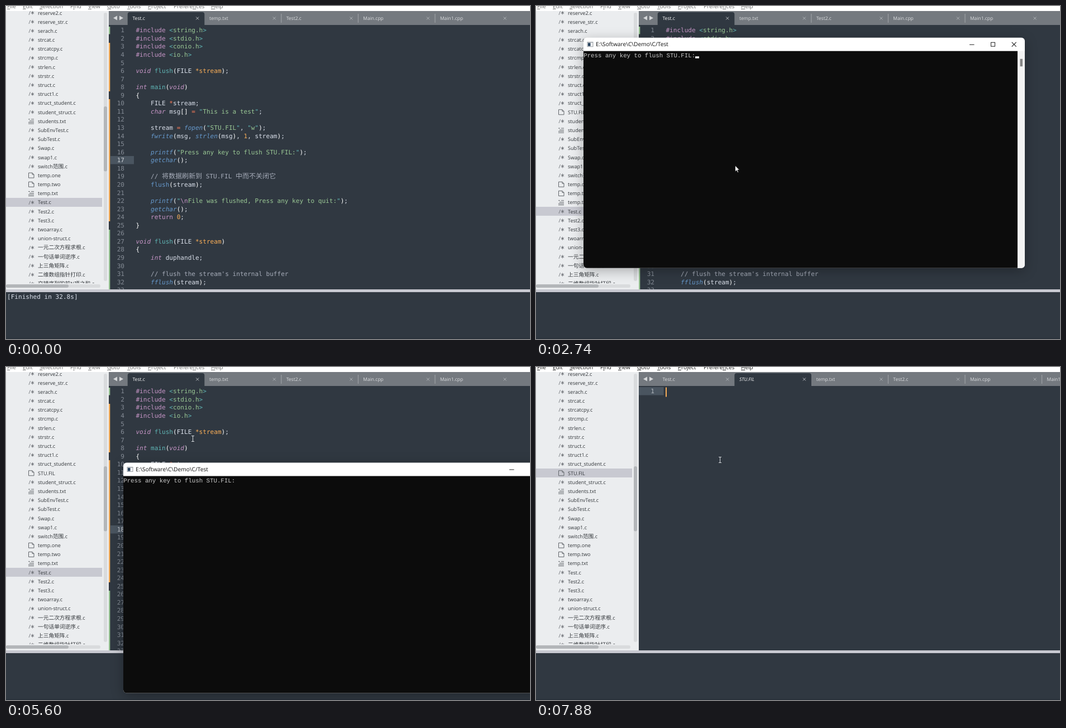
An HTML page with a canvas that plays this animation: 938 px wide and 597 px high, repeating every 8000 ms.

```html
<!DOCTYPE html>
<html lang="en">
<head>
<meta charset="utf-8">
<title>Flush demo</title>
<style>
html, body { margin: 0; width: 100%; height: 100%; overflow: hidden; background: #303841; }
canvas { display: block; width: 938px; height: 597px; }
</style>
</head>
<body>
<canvas id="stage" width="938" height="597"></canvas>
<script>
const W = 938, H = 597, LOOP = 8000;
const MONO = '"DejaVu Sans Mono", monospace';
const SANS = '"Open Sans", "Noto Sans", sans-serif';
const CJK = '"Noto Sans CJK SC", "Noto Sans CJK", sans-serif';
const C = {
  bg: '#303841', bar: '#74797f', line: '#4a5560', side: '#ebedef', pick: '#c8c9d1', hover: '#dfe1e4',
  text: '#d8dee9', purple: '#c695c6', blue: '#6699cc', teal: '#5fb4b4', green: '#99c794',
  orange: '#f9ae58', red: '#f97b58', note: '#a6acb9', num: '#848b95'
};
const T = { click: 1180, clear: 1990, open: 2320, ready: 2440, run: 2600, drag: 4860, drop: 5200, back: 5870, view: 7340 };

const CODE = `#include <string.h>
#include <stdio.h>
#include <conio.h>
#include <io.h>

void flush(FILE *stream);

int main(void)
{
    FILE *stream;
    char msg[] = "This is a test";

    stream = fopen("STU.FIL", "w");
    fwrite(msg, strlen(msg), 1, stream);

    printf("Press any key to flush STU.FIL:");
    getchar();

    // 将数据刷新到 STU.FIL 中而不关闭它
    flush(stream);

    printf("\\nFile was flushed, Press any key to quit:");
    getchar();
    return 0;
}

void flush(FILE *stream)
{
    int duphandle;

    // flush the stream's internal buffer
    fflush(stream);
`.split('\n');

// Later rules override earlier ones: pattern, colour, italic
const RULES = [
  [/[()[\]{}]/g, '#ffffff'],
  [/\b(void|int|char)\b/g, C.purple, true],
  [/#include|\breturn\b/g, C.purple],
  [/\b(fopen|fwrite|strlen|printf|getchar|fflush)\b/g, C.blue, true],
  [/\bflush(?=\(stream)/g, C.blue],
  [/(?<=void )flush|\bmain\b/g, C.teal],
  [/\b\d+\b/g, C.orange],
  [/[=*]/g, C.red],
  [/\*stream(?=\))/g, C.orange],
  [/"[^"]*"|<.*>/g, C.green],
  [/["<>]/g, C.teal],
  [/\\n/g, C.purple],
  [/\/\/.*/g, C.note]
];

const FILES = ('reserve2.c reserve_str.c serach.c strcat.c strcatcpy.c strcmp.c strlen.c strstr.c struct.c struct1.c ' +
  'struct_student.c student_struct.c students.txt SubEnvTest.c SubTest.c Swap.c swap1.c switch范围.c temp.one temp.two ' +
  'temp.txt Test.c Test2.c Test3.c twoarray.c union-struct.c 一元二次方程求根.c 一句话单词逆序.c 上三角矩阵.c ' +
  '二维数组指针打印.c 交错序列的前N项之和.c').split(' ');
const FILES2 = [...FILES.slice(0, 11), 'STU.FIL', ...FILES.slice(11)];

// label, x, index of the underlined letter
const MENU = [['File', 2, 0], ['Edit', 30, 0], ['Selection', 60, 0], ['Find', 115, 1], ['View', 147, 0], ['Goto', 181, 0],
  ['Tools', 217, 0], ['Project', 254, 0], ['Preferences', 300, 7], ['Help', 367, 0]];

// Pointer path: time, x, y
const PATH = [
  [260, 736, 523], [460, 459.5, 384.5], [660, 459, 383.5], [920, 357.5, 286.5], [2319, 357.5, 286.5],
  [2320, 356.5, 286], [2760, 356.5, 286], [3000, 329, 33], [3600, 329, 33], [4460, 309.5, 65.5], [4800, 309.5, 66],
  [5200, 434.5, 181], [5340, 434.5, 181], [5600, 334.5, 128.5], [5950, 334.5, 128.5], [6060, 339, 124],
  [6500, 41, 197], [6740, 62, 195.5], [6880, 62, 195], [7080, 67, 188.5], [7400, 67, 188.5], [7880, 329.5, 166.5]
];

const stage = document.getElementById('stage');
let g = stage.getContext('2d');
g.textRendering = 'geometricPrecision';

const isCjk = ch => /[\u3400-\u9fff]/.test(ch);
const lineY = n => 43.5 + 14.56 * (n - 1);
const rowY = i => 12.2 + 16.19 * i;
const mix = (a, b, p) => a + (b - a) * p;

function rect(x, y, w, h, color) {
  g.fillStyle = color;
  g.fillRect(x, y, w, h);
}

function round(x, y, w, h, r, color) {
  g.fillStyle = color;
  g.beginPath();
  g.roundRect(x, y, w, h, r);
  g.fill();
}

function lines(color, width, ...paths) {
  g.strokeStyle = color;
  g.lineWidth = width;
  g.beginPath();
  for (const p of paths) p.forEach(([x, y], i) => i ? g.lineTo(x, y) : g.moveTo(x, y));
  g.stroke();
}

function poly(points, color) {
  g.fillStyle = color;
  g.beginPath();
  points.forEach(([x, y]) => g.lineTo(x, y));
  g.closePath();
  g.fill();
}

function clip(x, y, w, h, draw) {
  g.save();
  g.beginPath();
  g.rect(x, y, w, h);
  g.clip();
  draw();
  g.restore();
}

function label(s, x, y, size, color, style = '') {
  g.fillStyle = color;
  for (const part of s.match(/[\u3400-\u9fff]+|[^\u3400-\u9fff]+/g)) {
    g.font = isCjk(part) ? `${size * 1.07}px ${CJK}` : `${style} ${size}px ${SANS}`;
    g.fillText(part, x, y);
    x += g.measureText(part).width;
  }
}

function mono(s, x, y, size, step, paint) {
  [...s].forEach((ch, i) => {
    const [color, italic] = paint(i);
    const wide = isCjk(ch);
    if (ch !== ' ') {
      g.fillStyle = color;
      g.font = wide ? `12px ${CJK}` : `${italic ? 'italic ' : ''}${size}px ${MONO}`;
      g.fillText(ch, x, y);
    }
    x += wide ? 12 : step;
  });
}

function codeLine(s, n) {
  const look = Array.from(s, () => [C.text, false]);
  for (const [re, color, italic] of RULES)
    for (const m of s.matchAll(re)) look.fill([color, italic], m.index, m.index + m[0].length);
  mono(s, 232.4, lineY(n) + 3.8, 11.06, 6.66, i => look[i]);
}

function lineNumber(n, color = C.num) {
  const s = String(n);
  mono(s, 212 - 6.66 * s.length, lineY(n) + 3.8, 11.06, 6.66, () => [color]);
}

// Code and line numbers never change, so they are drawn once
function makeLayer() {
  const layer = document.createElement('canvas');
  layer.width = W;
  layer.height = H;
  const main = g;
  g = layer.getContext('2d');
  g.textRendering = 'geometricPrecision';
  CODE.forEach((s, i) => {
    lineNumber(i + 1);
    codeLine(s, i + 1);
  });
  g = main;
  return layer;
}

function drawMenu(active) {
  rect(0, 0, W, 9, '#ffffff');
  const color = active ? '#1a1a1a' : '#6d6d6d';
  for (const [s, x, k] of MENU) {
    label(s, x, 4, 10, color);
    const a = x + g.measureText(s.slice(0, k)).width;
    rect(a, 5, g.measureText(s[k]).width, 0.9, color);
  }
}

function cross(x, y, r, color, width = 1) {
  lines(color, width, [[x - r, y - r], [x + r, y + r]], [[x + r, y - r], [x - r, y + r]]);
}

function drawTabs(view) {
  rect(184, 9, W - 184, 25, C.bar);
  poly([[192, 21.5], [199, 17.5], [199, 25.5]], '#d6d8da');
  poly([[210, 21.5], [203, 17.5], [203, 25.5]], '#d6d8da');
  const names = ['Test.c', ...(view ? ['STU.FIL'] : []), 'temp.txt', 'Test2.c', 'Main.cpp', 'Main1.cpp'];
  const active = view ? 1 : 0;
  names.forEach((s, i) => {
    const x = 217.7 + 137.6 * i, on = i === active;
    if (on) round(x, 11, 137.6, 23, [4, 4, 0, 0], C.bg);
    else if (i > active && i < names.length - 1) rect(x + 137, 14, 1, 16, '#a3a7ab');
    label(s, x + 8.8, 25, 8.5, on ? '#ffffff' : '#dcdee0', s === 'STU.FIL' ? 'italic' : '');
    cross(x + 125, 22, 2.5, on ? '#b9bdc2' : '#aeb2b6');
  });
}

function drawIcon(name, y) {
  const ink = '#62666b';
  if (name.endsWith('.c')) {
    label('/', 40.5, y + 3.5, 9.5, ink);
    lines(ink, 0.9, [[47.5, y - 3], [47.5, y + 3]], [[44.9, y - 1.5], [50.1, y + 1.5]], [[44.9, y + 1.5], [50.1, y - 1.5]]);
  } else if (name.endsWith('.txt')) {
    lines(ink, 1, [[40, y - 3.5], [43, y - 3.5]], [[45, y - 3.5], [50, y - 3.5]], [[42, y - 0.5], [50, y - 0.5]],
      [[40, y + 2], [50, y + 2]], [[40, y + 4.5], [50, y + 4.5]]);
  } else {
    lines(ink, 1, [[40.5, y - 4.5], [47, y - 4.5], [50, y - 1.5], [50, y + 4.5], [40.5, y + 4.5], [40.5, y - 4.5]],
      [[47, y - 4.5], [47, y - 1.5], [50, y - 1.5]]);
  }
}

function drawSidebar(t, pointer) {
  const files = t >= T.run ? FILES2 : FILES;
  const picked = t >= T.view ? 'STU.FIL' : 'Test.c';
  rect(0, 9, 184, 499, C.side);
  clip(0, 6, 174, 491, () => files.forEach((s, i) => {
    const y = rowY(i);
    const over = t > T.back && pointer.x < 172 && Math.abs(pointer.y - y) < 8.1;
    if (s === picked || over) rect(0, Math.round(y - 8), 172, 16, s === picked ? C.pick : C.hover);
    drawIcon(s, y);
    label(s, 57, y + 3.3, 9.1, '#33373b');
  }));
  round(175, 12, 6, 481, 3, '#d9dbdd');
  round(175, t >= T.run ? 178 : 180, 6, 116.5, 3, '#b3b6b9');
  round(0, 499, 169, 6, 3, '#d9dbdd');
  round(0, 499, 112, 6, 3, '#b3b6b9');
}

function caret(n) {
  rect(232, lineY(n) - 7, 2, 17, C.orange);
}

function drawEditor(t) {
  rect(184, 34, W - 184, 474, C.bg);
  const view = t >= T.view;
  const row = view ? 1 : t >= T.back ? 7 : t >= T.click ? 18 : 17;
  rect(view ? 184 : 187, Math.round(lineY(row) - 7.2), view ? 44.5 : 42, 14.5, C.line);
  if (view) {
    lineNumber(1, '#b4b9c0');
    caret(1);
    return;
  }
  rect(184, 37, 2.3, 13.5, C.green);
  rect(184, 66, 2.3, 87, C.orange);
  rect(184, 167, 2.3, 219, C.orange);
  rect(184, 401, 2.3, 107, C.green);
  clip(184, 34, W - 184, 474, () => {
    g.drawImage(layer, 0, 0);
    lineNumber(row, '#c0c5cc');
  });
  if (t >= T.click && t < T.open) {
    rect(232.4, lineY(9) + 6.5, 6.6, 1, C.orange);
    rect(232.4, lineY(25) + 6.5, 6.6, 1, C.orange);
    if (t < T.clear) caret(18);
  }
  if (t >= T.back) caret(7);
}

function drawOutput(t) {
  rect(0, 508, W, 5, C.pick);
  rect(0, 513, W, 84, C.bg);
  rect(0, 595, W, 2, '#29313a');
  if (t < T.clear) mono('[Finished in 32.8s]', 2, 524.5, 11.06, 6.66, () => [C.text]);
}

function drawConsole(t) {
  if (t < T.open || t >= T.back) return;
  const p = Math.min(1, (t - T.open) / 240);
  const ease = 1 - (1 - p) ** 2;
  const size = mix(0.843, 1, ease);
  const d = Math.max(0, Math.min(1, (t - T.drag + 40) / (T.drop - T.drag + 40)));
  const move = d * d * (3 - 2 * d);
  g.save();
  g.globalAlpha = mix(0.1, 1, ease);
  g.translate(mix(475.5, 480, ease) + 125 * move, mix(259.5, 263.3, ease) + 114.7 * move);
  g.scale(size, size);
  g.translate(-395, -206.5);
  g.save();
  if (p === 1) {
    g.shadowColor = 'rgba(0,0,0,.28)';
    g.shadowBlur = 22;
    g.shadowOffsetY = 5;
  }
  round(0, 0, 790, 413, 6, '#ffffff');
  g.restore();
  if (t >= T.ready) {
    round(0, 24, 777, 389, [0, 0, 0, 6], '#0c0c0c');
    round(777, 24, 13, 389, [0, 0, 6, 0], '#f3f3f3');
    rect(781.5, 38, 4.5, 13.5, '#858585');
    rect(6.5, 7.5, 11, 9, '#9aa0a6');
    rect(7.5, 9, 9, 6.5, '#f4f4f4');
    rect(8, 9.5, 4.5, 5.5, '#26415c');
    label('E:\\Software\\C\\Demo\\C/Test', 22, 15.7, 10.2, '#111111');
    lines('#222222', 1, [[691, 12.5], [699.5, 12.5]]);
    g.strokeRect(729.5, 8.5, 7, 7);
    cross(770.7, 12, 4, '#222222', 1.1);
  }
  if (t >= T.run) {
    g.fillStyle = '#cccccc';
    g.font = '10.75px "Liberation Mono", monospace';
    [...'Press any key to flush STU.FIL:'].forEach((ch, i) => g.fillText(ch, 0.2 + 6.45 * i, 35));
    const on = t < 3390 || Math.floor((t - 3390) / 530) % 2 === 1;
    if (on) rect(200, 33.5, 7, 3.5, '#f2f2f2');
  }
  g.restore();
}

function pointerAt(t) {
  if (t < PATH[0][0]) return { x: -99, y: -99 };
  const i = PATH.findIndex(k => k[0] > t);
  if (i < 0) {
    const [, x, y] = PATH[PATH.length - 1];
    return { x, y };
  }
  const [t0, x0, y0] = PATH[i - 1], [t1, x1, y1] = PATH[i];
  let p = (t - t0) / (t1 - t0);
  p = p * p * (3 - 2 * p);
  if (t >= T.drag - 60 && t < T.drop) {
    const d = Math.max(0, (t - T.drag + 40) / (T.drop - T.drag + 40));
    p = d * d * (3 - 2 * d);
  }
  return { x: mix(x0, x1, p), y: mix(y0, y1, p) };
}

function drawPointer(t, { x, y }) {
  const beam = t < T.open || (t > 5340 && t < T.back && y < 172) || (t >= T.back && x > 184);
  if (beam) {
    lines('#d5d8dc', 1, [[x, y - 4.5], [x, y + 4.5]], [[x - 2.5, y - 5], [x + 2.5, y - 5]], [[x - 2.5, y + 5], [x + 2.5, y + 5]]);
    return;
  }
  const shape = [[0, 0], [0, 11], [2.6, 8.7], [4.4, 12.6], [6, 11.9], [4.4, 8], [7.8, 8]].map(([a, b]) => [x + a, y + b]);
  poly(shape, '#ffffff');
  lines('#111111', 0.8, [...shape, shape[0]]);
}

function draw(t) {
  const pointer = pointerAt(t);
  drawMenu((t >= T.click && t < T.open) || t >= T.back);
  drawEditor(t);
  drawTabs(t >= T.view);
  drawSidebar(t, pointer);
  drawOutput(t);
  drawConsole(t);
  drawPointer(t, pointer);
}

const layer = makeLayer();
const start = performance.now();
function tick() {
  draw((performance.now() - start) % LOOP);
  requestAnimationFrame(tick);
}
tick();
</script>
</body>
</html>
```
